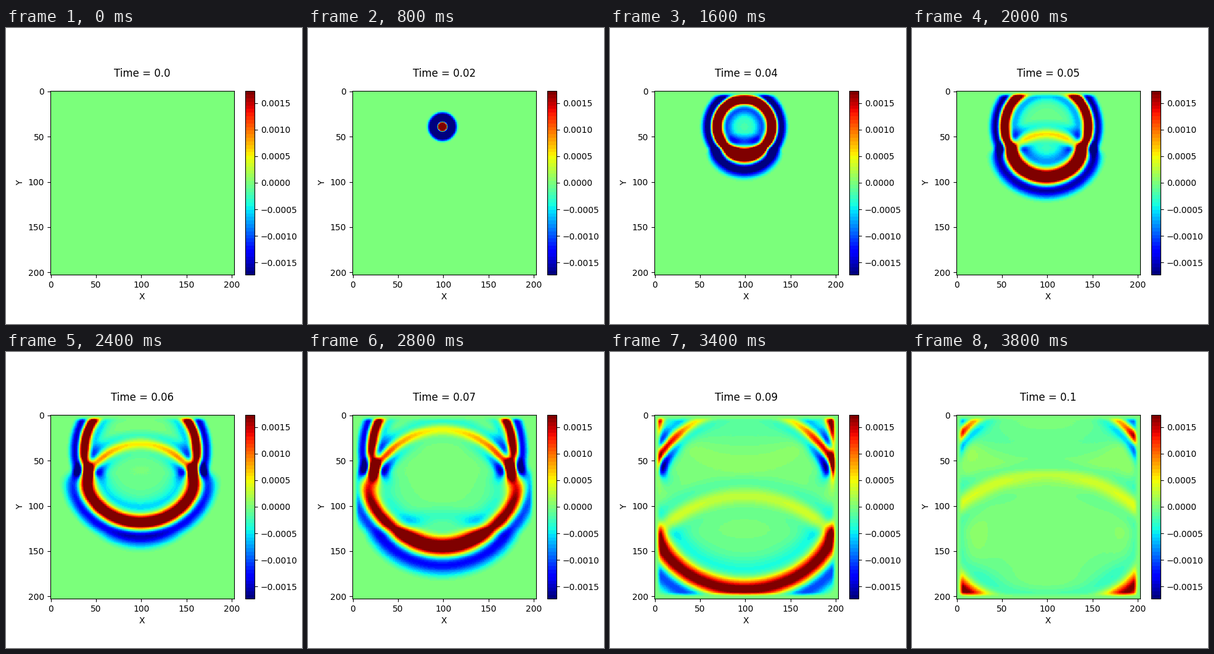
These frames come from a looping animation (480 px wide and 480 px high, 4 s). A matplotlib script:

```python
import numpy as np
import matplotlib.pyplot as plt
from matplotlib.animation import FuncAnimation

SIZE = 480
N = 203                      # visible cells per side, 1 m each
PAD = 45                     # hidden absorbing cells around them
FRAMES, STEPS = 20, 40
T_END = 0.1
DT = T_END / (FRAMES - 1) / STEPS
SRC_X, SRC_Y = 99, 39
PEAK_FREQ, DELAY, ONSET = 60.0, 0.02, 0.0085
V_MAX = 0.00173


def smoothstep(x):
    x = np.clip(x, 0, 1)
    return x * x * (3 - 2 * x)


def ricker(t):
    a = (np.pi * PEAK_FREQ * (t - DELAY)) ** 2
    return (1 - 2 * a) * np.exp(-a) * smoothstep((t - ONSET) / 0.0015)


def laplacian(u):
    near = u[1:-3, 2:-2] + u[3:-1, 2:-2] + u[2:-2, 1:-3] + u[2:-2, 3:-1]
    far = u[:-4, 2:-2] + u[4:, 2:-2] + u[2:-2, :-4] + u[2:-2, 4:]
    return 4 / 3 * near - far / 12 - 5 * u[2:-2, 2:-2]


def simulate():
    """Acoustic wave through three flat layers; one snapshot per frame."""
    cells = np.arange(-PAD, N + PAD)
    speed = np.select([cells < 67, cells < 134], [1500.0, 2250.0], 3000.0)
    courant = (speed[2:-2, None] * DT) ** 2

    outside = np.maximum(0, np.maximum(-cells, cells - N + 1))
    sponge = np.exp(-(0.006 * outside) ** 2)
    sponge = sponge[:, None] * sponge[None, :]

    idx = np.arange(N)
    edge = smoothstep((np.minimum(idx, N - 1 - idx) - 1.5) / 5.5)
    fade = edge[:, None] * edge[None, :]

    u = np.zeros((cells.size, cells.size))
    old = u.copy()
    shots = []
    for n in range(STEPS * (FRAMES - 1) + 1):
        if n % STEPS == 0:
            shots.append(u[PAD:-PAD, PAD:-PAD] * fade)
        new = 2 * u - old
        new[2:-2, 2:-2] += courant * laplacian(u)
        new[SRC_Y + PAD, SRC_X + PAD] += ricker(n * DT)
        old, u = u * sponge, new * sponge
    shots = np.array(shots)
    # Scale by the leading trough of the direct wave in the top layer
    return shots * 0.0015 / -shots[12, SRC_Y, :40].min()


def box(left, top, width, height):
    return [left / SIZE, 1 - (top + height) / SIZE, width / SIZE, height / SIZE]


waves = simulate()

fig = plt.figure(figsize=(4.8, 4.8), dpi=100)
ax = fig.add_axes(box(72, 102.2, 297.6, 297.6))
image = ax.imshow(waves[0], cmap=plt.get_cmap("jet", 51), vmin=-V_MAX, vmax=V_MAX,
                  interpolation="nearest", aspect="auto")
ax.set_xticks(range(0, 201, 50))
ax.set_yticks(range(0, 201, 50))
ax.set_xlabel("X")
ax.set_ylabel("Y")

cax = fig.add_axes(box(388.2, 102.2, 14.9, 297.6))
fig.colorbar(image, cax=cax, ticks=np.arange(-3, 4) * 0.0005)

title = fig.text(220.8 / SIZE, 401 / SIZE, "", size=12, ha="center", va="baseline")


def update(k):
    image.set_data(waves[k])
    title.set_text(f"Time = {round(k * T_END / (FRAMES - 1), 2)}")
    return image, title


anim = FuncAnimation(fig, update, frames=FRAMES, interval=200, repeat=True,
                     repeat_delay=0, blit=False)
plt.show()
```
